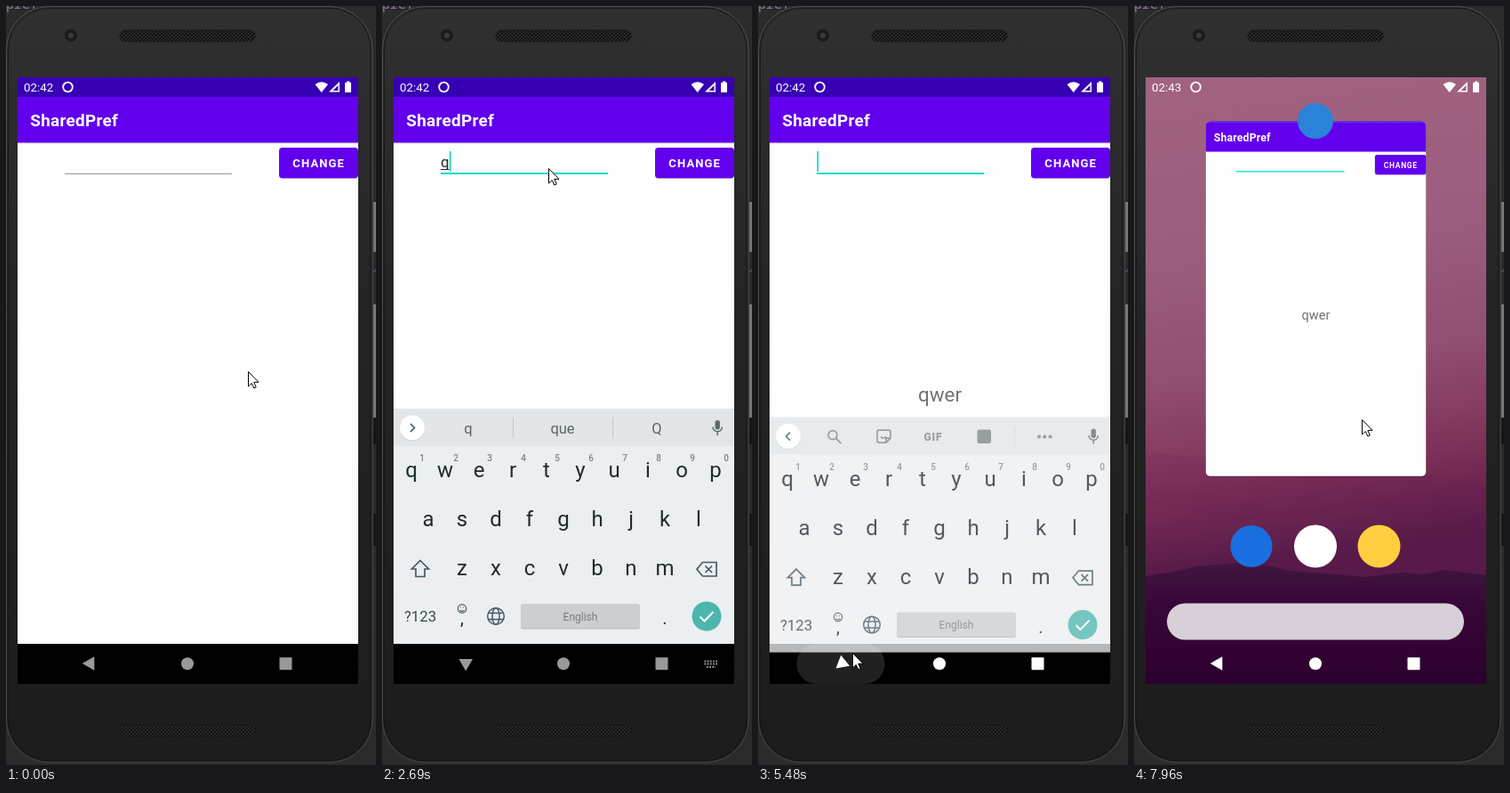
Animation, 416 px wide and 852 px high, one loop 8 s. Source, as an HTML page:

```html
<!DOCTYPE html>
<html lang="en">
<head>
<meta charset="utf-8">
<title>Shared preferences demo</title>
<style>
  html, body { margin: 0; width: 100%; height: 100%; overflow: hidden; background: #2b2b2b; }
  svg { display: block; }
  text { font-family: Roboto, "Noto Sans", sans-serif; white-space: pre; }
  .mid { text-anchor: middle; }
  .line { fill: none; stroke: #455a64; stroke-width: 1.7; }
</style>
</head>
<body>
<svg width="416" height="852" viewBox="0 0 416 852">
  <defs>
    <linearGradient id="body" x2="0" y2="1">
      <stop stop-color="#303030"/><stop offset=".4" stop-color="#242424"/><stop offset="1" stop-color="#1c1c1c"/>
    </linearGradient>
    <linearGradient id="sky" x2=".08" y2="1">
      <stop stop-color="#a2637f"/><stop offset=".3" stop-color="#9b5d7f"/><stop offset=".5" stop-color="#914f72"/>
      <stop offset=".62" stop-color="#863c61"/><stop offset=".71" stop-color="#762b54"/><stop offset=".82" stop-color="#581a49"/>
    </linearGradient>
    <linearGradient id="hill" x2="0" y2="1">
      <stop stop-color="#40163f"/><stop offset=".35" stop-color="#380638"/><stop offset="1" stop-color="#2c002e"/>
    </linearGradient>
    <pattern id="mesh" width="4" height="4" patternUnits="userSpaceOnUse">
      <rect width="4" height="4" fill="#2b2b2b"/>
      <circle cx="1" cy="1" r="1.1" fill="#0c0c0c"/><circle cx="3" cy="3" r="1.1" fill="#0c0c0c"/>
    </pattern>
    <clipPath id="crop"><rect id="cropBox" x="13" width="383"/></clipPath>
    <clipPath id="screen"><rect x="13" y="80" width="383" height="681"/></clipPath>
  </defs>

  <!-- Phone body -->
  <rect width="416" height="852" fill="#2b2b2b"/>
  <text x="0" y="3" font-size="15" fill="#9876aa" style="font-family:'Noto Sans Mono',monospace">pref</text>
  <path d="M414.5 220v56M414.5 335v127" stroke="#777" stroke-width="3"/>
  <path d="M414.5 462v30M414.5 570v36" stroke="#161616" stroke-width="3"/>
  <path d="M413 299l3-3" stroke="#8a6fc0"/>
  <rect x=".5" y=".5" width="411.5" height="848.5" rx="48" fill="url(#body)" stroke="#4a4a4a"/>
  <rect x="2.5" y="2.5" width="407.5" height="844.5" rx="46" fill="none" stroke="#151515"/>
  <circle cx="73" cy="33" r="7" fill="#1b1b1b"/><circle cx="73" cy="33" r="3" fill="#3c3c3c"/>
  <rect x="128" y="27" width="152" height="13" rx="6" fill="url(#mesh)" stroke="#1a1a1a"/>
  <rect x="128" y="806.5" width="153" height="13" rx="6" fill="url(#mesh)" stroke="#141414"/>

  <g clip-path="url(#screen)">
    <!-- Home screen -->
    <rect x="13" y="80" width="383" height="681" fill="url(#sky)"/>
    <path d="M13 500L150 516 260 512 396 540V580L250 566 120 578 13 560Z" fill="#5a1850" opacity=".1"/>
    <path d="M13 640L50 634 70 629 95 627 120 625 150 628 175 634 215 637 260 641 300 636 325 638 350 633 396 639V761H13Z" fill="url(#hill)"/>
    <circle cx="132" cy="606.5" r="23.5" fill="#1a6fe0"/>
    <circle cx="204" cy="606.5" r="24" fill="#fff"/>
    <circle cx="275.5" cy="606.5" r="24" fill="#ffcd40"/>
    <rect x="37" y="670.5" width="334" height="41" rx="20.5" fill="#d8d0d8"/>

    <!-- App window -->
    <g id="card"><g clip-path="url(#crop)">
      <rect x="13" y="80" width="383" height="681" fill="#fefefe"/>
      <rect x="13" y="153.5" width="383" height="1" fill="#e2e2e2"/>
      <rect x="13" y="80" width="383" height="22" fill="#3700b3"/>
      <rect x="13" y="102" width="383" height="51.5" fill="#6200ee"/>
      <text x="27.3" y="135" font-size="18.9" font-weight="600" letter-spacing=".3" fill="#fff">SharedPref</text>
      <rect x="307" y="159.5" width="89" height="34.5" rx="4" opacity=".2"/>
      <rect x="307" y="159" width="89" height="34.2" rx="3.7" fill="#6200ee"/>
      <rect id="press" x="307" y="159" width="89" height="34.2" rx="3.7" fill="#fff"/>
      <text x="322.3" y="181.3" font-size="13.05" font-weight="600" letter-spacing="1.1" fill="#fff">CHANGE</text>
      <rect id="rule" x="66" width="188"/>
      <text id="typed" x="66" y="181" font-size="16.8" fill="#222"/>
      <rect id="compose" x="66" y="183" height="1" fill="#222"/>
      <rect id="caret" y="163" width="1.6" height="23" fill="#03dac5"/>
      <text id="result" class="mid" x="204.5" y="444" font-size="22.4" fill="#757075">qwer</text>
      <rect x="13" y="716" width="383" height="45"/>
    </g></g>
    <circle id="badge" cx="204" cy="129" fill="#2a83d8"/>

    <!-- Keyboard -->
    <g id="board">
      <rect x="13" y="452" width="383" height="264" fill="#eceff1"/>
      <rect x="13" y="452" width="383" height="42" fill="#e2e6e9"/>
      <circle cx="34" cy="474.4" r="14" opacity=".12"/>
      <circle cx="34" cy="473.5" r="14" fill="#fff"/>
      <path id="chevron" class="line" d="M32 469l4.5 4.5-4.5 4.5"/>
      <g fill="#5f6b71">
        <rect x="374.5" y="465" width="5.4" height="10.5" rx="2.7"/>
        <path d="M372 472.5a5.2 5.2 0 0 0 10.4 0M377.2 478v4" class="line" style="stroke:#5f6b71;stroke-width:1.5"/>
      </g>
      <g id="words" font-size="16.5" fill="#5b6468">
        <text class="mid" x="97" y="480"/><text class="mid" x="203" y="480"/><text class="mid" x="309" y="480"/>
        <path d="M147.5 462v23M259.5 462v23" stroke="#c3c8cb"/>
      </g>
      <g id="tools" fill="#7a8489">
        <g class="line" style="stroke:#7a8489">
          <circle cx="84" cy="472" r="5"/><path d="M87.5 475.5l6 6"/>
          <path d="M136 466.5h11a2 2 0 0 1 2 2v7l-5 5h-8a2 2 0 0 1-2-2v-10a2 2 0 0 1 2-2ZM149 475.5h-5v5M138 474a3.5 3 0 0 0 6 0"/>
        </g>
        <text class="mid" x="197" y="478" font-size="12" font-weight="900" letter-spacing=".8">GIF</text>
        <rect x="246.5" y="466" width="15.5" height="15.5" rx="2"/>
        <path d="M288.5 463v21" stroke="#d0d5d8"/>
        <circle cx="316" cy="474" r="2"/><circle cx="322.3" cy="474" r="2"/><circle cx="328.6" cy="474" r="2"/>
      </g>
      <g id="keys" fill="#1e2b32" font-size="24"></g>
      <path class="line" d="M43 622.5l9.5 9.5h-4.5v8.5h-10v-8.5h-4.5Z"/>
      <path class="line" d="M360.5 624.5H376v15.5H360.5L354 632.2ZM363.5 628.5l7.5 7.5M371 628.5l-7.5 7.5"/>
      <text class="mid" x="43" y="691" font-size="16.8" fill="#37474f">?123</text>
      <g class="line" style="stroke-width:1.2">
        <circle cx="90" cy="676.5" r="4.7"/><path d="M87.5 678a2.7 2.2 0 0 0 5 0M88 675h1M91 675h1"/>
      </g>
      <g class="line" style="stroke-width:1.5">
        <circle cx="128" cy="685" r="9.3"/><ellipse cx="128" cy="685" rx="4" ry="9.3"/>
        <path d="M119.5 681.5h17M119.5 688.5h17"/>
      </g>
      <rect x="156" y="672" width="134" height="27.5" rx="3" fill="#b4b9bc"/>
      <rect x="156" y="671" width="134" height="27.5" rx="3" fill="#cbcfd2"/>
      <text class="mid" x="223" y="689.5" font-size="12" fill="#757b80">English</text>
      <circle cx="365" cy="685" r="16.5" fill="#4db6ac"/>
      <path d="M357.5 685.5l5 5 10-10.5" fill="none" stroke="#fff" stroke-width="2"/>
    </g>

    <!-- System bars -->
    <rect id="ripple" y="716" height="45" rx="22.5" fill="#fff"/>
    <g id="nav">
      <path id="back" d="M85.7 738l13.6-7.8v15.6Z"/>
      <circle cx="204" cy="738.3" r="7"/>
      <rect x="307.5" y="731.3" width="14" height="14" rx="1"/>
      <path id="hide" d="M362.5 735.5h15M362.5 738.5h15M365 742h10" fill="none" stroke="#999" stroke-width="1.8" stroke-dasharray="1.8 1.4"/>
    </g>
    <g fill="#fff">
      <text id="clock" x="20" y="96" font-size="13.3"/>
      <circle cx="69.5" cy="91" r="5.3" fill="none" stroke="#fff" stroke-width="1.8"/>
      <path d="M347.5 88q7.2-5.5 14.5 0L354.7 97Z"/>
      <path d="M375 85v11.5h-12ZM373.5 89v6h-6Z" fill-rule="evenodd"/>
      <path d="M383 84.5h3.5v1.5h1.5v11h-7v-11h2Z"/>
    </g>
  </g>
  <path id="mouse" d="M.5.5V17L4.3 13.5 6.8 19 9.2 18 6.8 12.3H12Z" fill="#fff" stroke="#000"/>
</svg>

<script>
const $ = id => document.getElementById(id);
const set = (id, attrs) => { for (const k in attrs) $(id).setAttribute(k, attrs[k]); };
const show = (id, on) => set(id, { visibility: on ? 'visible' : 'hidden' });
const ramp = (t, from, to) => Math.min(1, Math.max(0, (t - from) / (to - from)));
const smooth = u => u * u * (3 - 2 * u);

// Keyboard letters: text, first x, baseline
const rows = [['qwertyuiop', 33, 529], ['asdfghjkl', 52, 584], ['zxcvbnm', 90, 639]];
let keys = rows.map(([s, x, y]) =>
  [...s].map((c, i) => `<text class="mid" x="${x + i * 38}" y="${y}">${c}</text>`).join('')).join('');
for (let i = 0; i < 10; i++)
  keys += `<text class="mid" x="${45 + i * 38}" y="511" font-size="10" font-weight="500" fill="#78848a">${(i + 1) % 10}</text>`;
keys += '<text class="mid" x="90" y="694" font-size="20">,</text><text class="mid" x="318" y="694" font-size="20">.</text>';
$('keys').innerHTML = keys;

// Pointer path: time, x, y
const path = [
  [0, 272, 410], [370, 272, 410], [440, 269, 403], [540, 269, 403], [610, 268, 400], [840, 268, 400],
  [1680, 191, 190], [1800, 187, 182], [3080, 187, 182], [3600, 328, 182], [4350, 328, 182],
  [5250, 106, 726], [5950, 106, 726], [6400, 281, 750], [6650, 312, 738], [6900, 312, 738],
  [7100, 309, 676], [7640, 257, 470], [7800, 257, 470], [7960, 256, 464], [8000, 256, 464]
];
function pointer(t) {
  const i = path.findIndex(p => p[0] > t), [t0, x0, y0] = path[i - 1], [t1, x1, y1] = path[i];
  const u = smooth(ramp(t, t0, t1));
  return `translate(${x0 + (x1 - x0) * u} ${y0 + (y1 - y0) * u})`;
}

const FOCUS = 1960, CLEAR = 4010, RECENTS = 6940;
const strokes = [2690, 2860, 3010, 3240];
const advance = [0, 9.5, 22, 31, 36.8];
const hints = [['q', 'que', 'Q'], ['qw', 'que', 'QW'], ['qwe', 'qwerty', 'QWE'], ['qwer', 'qwerty', 'QWERTY']];

function field(t) {
  const focused = t >= FOCUS;
  const n = t < CLEAR ? strokes.filter(s => s <= t).length : 0;
  const since = t >= CLEAR ? CLEAR : n ? strokes[n - 1] : FOCUS;
  $('typed').textContent = 'qwer'.slice(0, n);
  set('compose', { width: advance[n] });
  set('caret', { x: 66.4 + advance[n] });
  show('caret', focused && t < 6870 && (t - since) % 1000 < 500);
  set('rule', focused ? { y: 187, height: 1.9, fill: '#03dac5' } : { y: 187.8, height: 1, fill: '#8c8c8c' });
  set('press', { opacity: t < 3860 ? 0 : .22 * ramp(t, 3860, 3960) * (1 - ramp(t, 4050, 4450)) });
  show('result', t >= CLEAR);
  return n;
}

function keyboard(t, n) {
  const enter = ramp(t, 2040, 2230), leave = ramp(t, 5440, 5620);
  set('board', {
    transform: `translate(0 ${53 * (1 - enter) + 42 * leave})`,
    opacity: enter ? Math.min(1, .45 + .7 * enter) * (1 - leave) : 0
  });
  const tools = n ? 0 : t < CLEAR ? ramp(t, 2150, 2230) : ramp(t, CLEAR, CLEAR + 150);
  set('tools', { opacity: tools });
  set('chevron', { transform: `rotate(${tools ? 180 : 0} 34 473.5)` });
  set('words', { opacity: n ? 1 : 0 });
  if (n) $('words').querySelectorAll('text').forEach((e, i) => e.textContent = hints[n - 1][i]);
}

function navigation(t) {
  const lit = (t > 1990 && t < 2200) || t > 5250;
  set('nav', { fill: lit ? '#fff' : '#999' });
  const turn = smooth(ramp(t, 1970, 2145)) - smooth(ramp(t, 5405, 5545));
  set('back', { transform: `rotate(${-90 * turn} 94.2 738)` });
  show('hide', t > 2040 && t < 5440);
  const second = t > 6500, start = second ? 6740 : 5290, mid = second ? 314.5 : 93;
  const half = 49.5 * (.5 + .5 * ramp(t, start, start + 150));
  const fade = second ? 1 - ramp(t, 7000, 7250) : 1 - ramp(t, 5800, 6050);
  set('ripple', { x: mid - half, width: 2 * half, opacity: t < start ? 0 : .13 * fade });
}

function overview(t) {
  const p = 1 - (1 - ramp(t, RECENTS, RECENTS + 400)) ** 3, s = 1 - .3525 * p;
  const inset = p ** 1.3; // the bars are cropped a little later than the window shrinks
  set('card', { transform: `translate(${204.5 * (1 - s)} ${182 * (1 - s)}) scale(${s})` });
  $('card').style.filter = p ? 'drop-shadow(0 1.5px 1px #0007)' : 'none';
  set('cropBox', { y: 80 + 20.5 * inset, height: 681 - 65.5 * inset, rx: 8 * p });
  set('badge', { r: 20 * smooth(ramp(t, 7770, 7930)) });
}

function frame(now) {
  const t = now % 8000;
  keyboard(t, field(t));
  navigation(t);
  overview(t);
  $('clock').textContent = t < 6100 ? '02:42' : '02:43';
  set('mouse', { transform: pointer(t) });
  requestAnimationFrame(frame);
}
frame(0);
</script>
</body>
</html>
```
